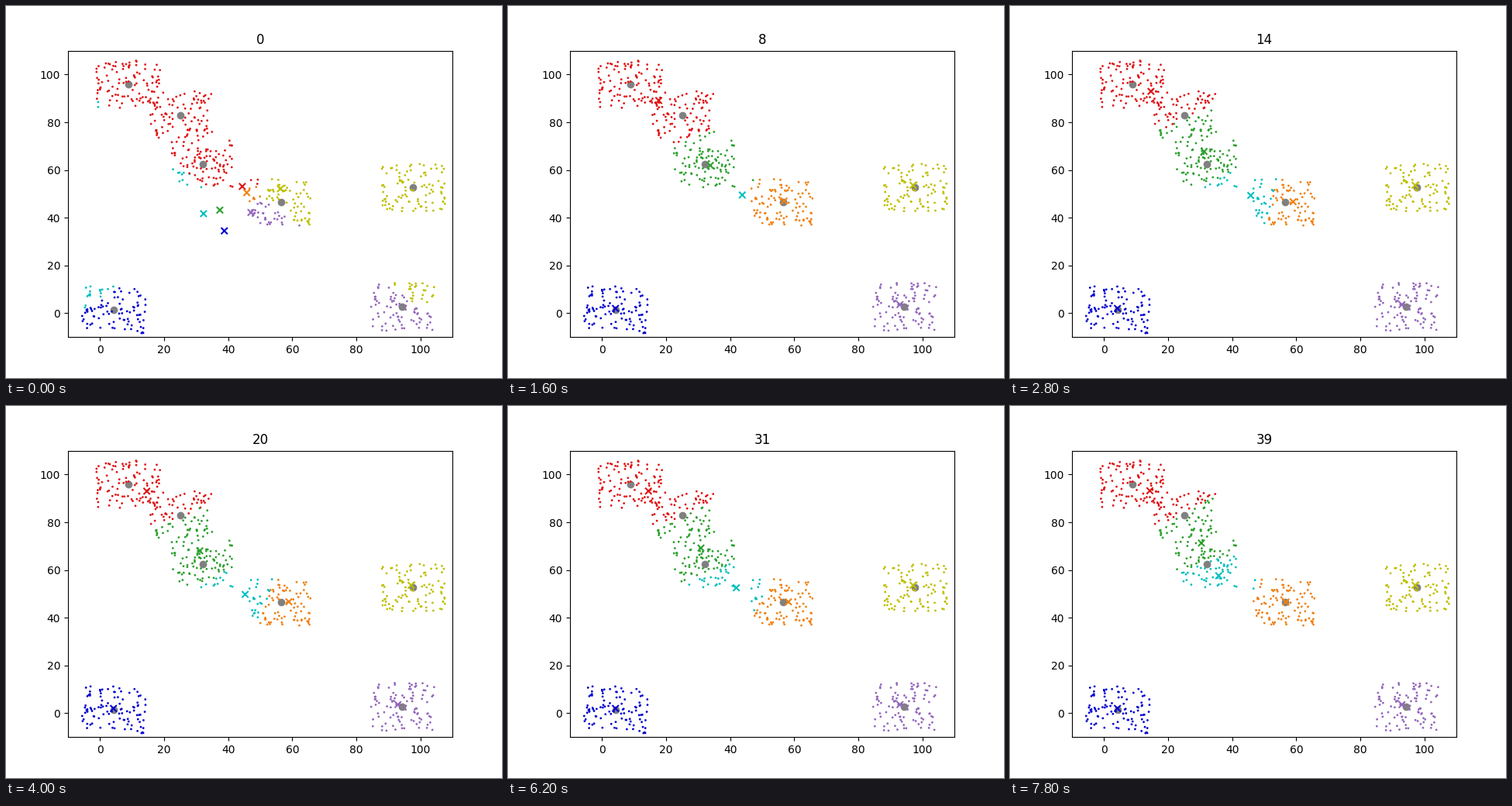
Animation of 640 by 480 pixels, one loop 8000 ms. Source, as a matplotlib script:

```python
import numpy as np
import matplotlib.pyplot as plt
from matplotlib.animation import FuncAnimation

FRAMES = 40
STEP_MS = 200
RESEED_STEP = 8

# Centres of the point clouds, each a square of half-width SPREAD.
CENTERS = np.array([(8.8, 96.0), (25.1, 83.0), (32.1, 62.5), (56.6, 46.5),
                    (97.7, 52.7), (4.3, 1.4), (94.3, 2.7)])
SPREAD = 10
PER_CLOUD = 100

# Centroids in order: red, orange, green, cyan, yellow, blue, purple.
COLORS = np.array(["#e01414", "#f08010", "#2ca02c", "#00bfbf",
                   "#bfbf00", "#0000d0", "#9467bd"])
GREEN, CYAN = 2, 3
START = np.array([(44.4, 53.1), (45.8, 50.5), (37.4, 43.2), (32.3, 41.7),
                  (56.3, 52.1), (38.8, 34.5), (47.1, 42.2)])
SETTLED = np.array([(17.7, 89.1), (56.8, 47.0), (33.8, 61.9), (13.0, 30.0),
                    (97.1, 53.6), (4.2, 2.0), (93.0, 3.6)])
RESEED = (43.8, 49.5)
# Only the first four centroids move on after the reseed.
SPLIT = np.array([(14.6, 93.0), (59.1, 46.7), (31.2, 67.8), (46.0, 49.2)])
LAST = np.array([(14.3, 93.2), (56.8, 46.6), (30.4, 71.3), (35.8, 57.6)])


def make_points():
    rng = np.random.default_rng(7)
    offsets = rng.uniform(-SPREAD, SPREAD, (len(CENTERS), PER_CLOUD, 2))
    return (CENTERS[:, None] + offsets).reshape(-1, 2)


def centroids(step):
    if step < RESEED_STEP:
        ease = np.full((len(START), 1), 1 - np.exp(-1.5 * step))
        ease[GREEN] = (step / RESEED_STEP) ** 3
        return START + (SETTLED - START) * ease
    pos = SETTLED.copy()
    pos[CYAN] = RESEED
    moving = pos[:len(SPLIT)]
    moving += (SPLIT - moving) * (1 - np.exp((RESEED_STEP - step) / 1.5))
    moving += (LAST - SPLIT) * (step / (FRAMES - 1)) ** 4
    return pos


def nearest(points, targets):
    gap = points[:, None] - targets[None]
    return (gap ** 2).sum(axis=2).argmin(axis=1)


points = make_points()

fig, ax = plt.subplots(figsize=(6.4, 4.8), dpi=100)
ax.set_xlim(-10, 110)
ax.set_ylim(-10, 110)
title = ax.set_title("0")
ax.scatter(*CENTERS.T, color="gray")
dots = ax.scatter(*points.T, s=1, c=COLORS[nearest(points, START)])
crosses = ax.scatter(*START.T, marker="x", c=COLORS)


def draw(step):
    # Points keep the labels found before the centroids moved.
    labels = nearest(points, centroids(max(step - 1, 0)))
    dots.set_color(COLORS[labels])
    crosses.set_offsets(centroids(step))
    title.set_text(str(step))
    return dots, crosses, title


anim = FuncAnimation(fig, draw, frames=FRAMES, interval=STEP_MS,
                     repeat=True, repeat_delay=0)
plt.show()
```
